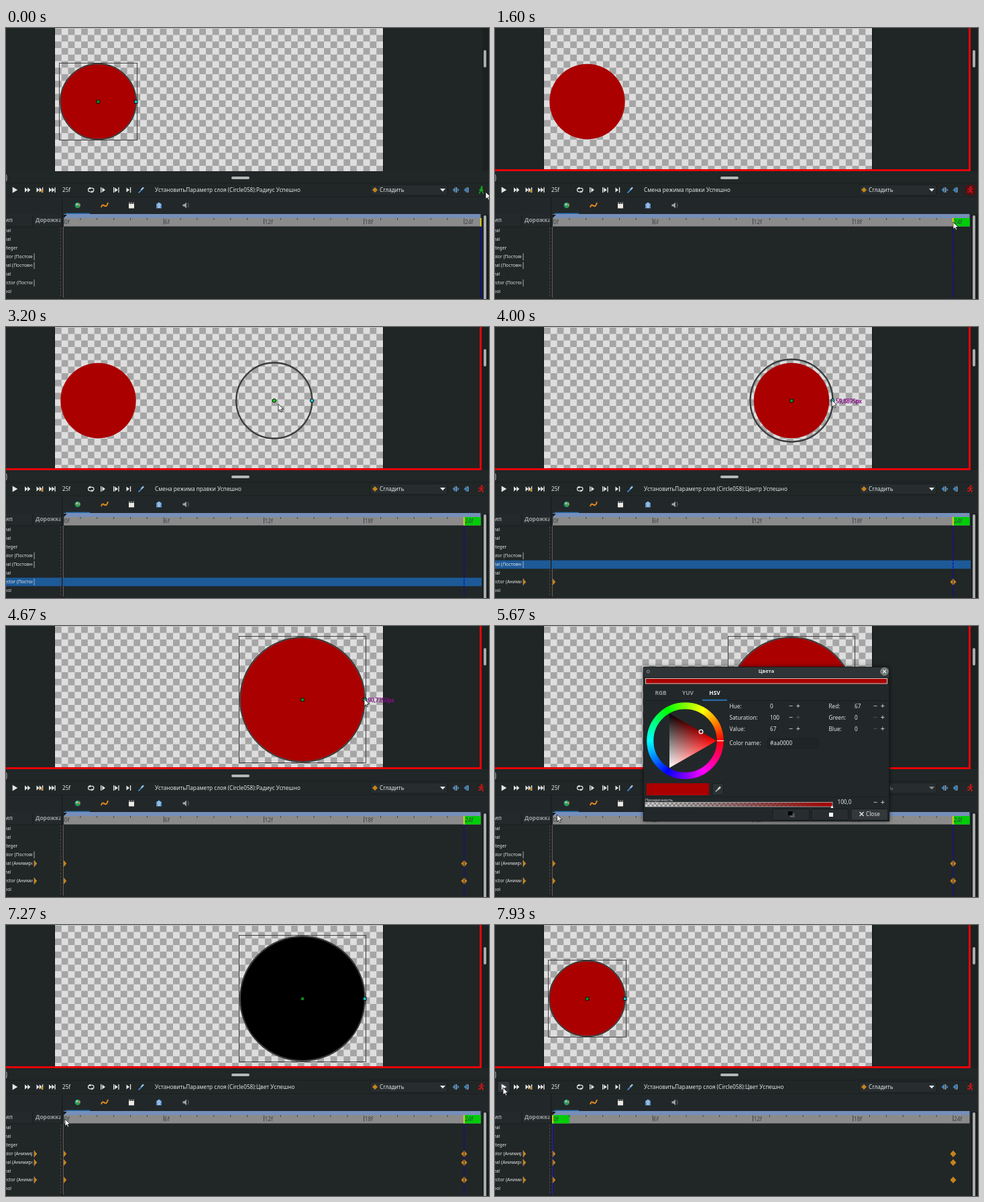
An HTML page with a canvas for the animation above (8000 ms loop, 720x405 px).

```html
<!DOCTYPE html>
<html lang="ru">
<head>
<meta charset="utf-8">
<style>
html, body { margin: 0; width: 720px; height: 405px; overflow: hidden; background: #202526; }
canvas { display: block; }
</style>
</head>
<body>
<canvas id="stage" width="720" height="405"></canvas>
<script>
const c = document.getElementById('stage').getContext('2d');
const LOOP = 8000, STEP = 24.87, ZOOM = 1.0225, LEFT = 137.5, RIGHT = 442, CY = 110, TILE = 9.78;
const FONT = '"Noto Sans", "Open Sans", sans-serif';
const ORANGE = '#c5831c', BLUE = '#1d5a98', INK = '#e4e6e6';
const T = { edit: 600, seek: 1500, shown: 1720, grab: 2500, moved: 3450, pull: 3810,
  sized: 4600, dialog: 5500, tint: 5950, close: 6680, rewind: 7300 };

// Pointer stops: time, x, y
const stops = [
  [0, 715, 245], [130, 715, 245], [330, 709, 243], [640, 709, 243], [1250, 683, 290],
  [1680, 683, 290], [2350, 145, 115], [2550, 145, 115], [3400, 448, 115], [3520, 448, 115],
  [3780, 497, 109], [3850, 497, 109], [4500, 534, 109], [4700, 534, 109], [5200, -12, 342],
  [5560, -12, 342], [5850, 307, 158], [5950, 307, 158], [6200, 260, 131], [6270, 260, 131],
  [6560, 541, 281], [6720, 541, 281], [7180, 88, 290], [7400, 88, 290], [7860, 12, 243], [8000, 12, 243]
];

const mix = (a, b, u) => a + (b - a) * u;
const snap = v => Math.floor(v) + .5;
const frameX = f => 86 + f * STEP;
function ease(t, a, b) {
  const u = Math.min(1, Math.max(0, (t - a) / (b - a)));
  return u * u * (3 - 2 * u);
}
function pointer(t) {
  const i = Math.max(1, stops.findIndex(s => s[0] > t));
  const [t0, x0, y0] = stops[i - 1], [t1, x1, y1] = stops[i];
  const u = ease(t, t0, t1);
  return [mix(x0, x1, u), mix(y0, y1, u)];
}

function rect(x, y, w, h, fill) { c.fillStyle = fill; c.fillRect(x, y, w, h); }
function frame(x, y, w, h, color, lw = 1) {
  c.strokeStyle = color; c.lineWidth = lw; c.strokeRect(x, y, w, h);
}
function round(x, y, w, h, r, fill, stroke) {
  c.beginPath(); c.roundRect(x, y, w, h, r);
  if (fill) { c.fillStyle = fill; c.fill(); }
  if (stroke) { c.strokeStyle = stroke; c.lineWidth = .8; c.stroke(); }
}
function poly(pts, fill, x = 0, y = 0) {
  c.beginPath();
  for (let i = 0; i < pts.length; i += 2) c.lineTo(x + pts[i], y + pts[i + 1]);
  c.closePath(); c.fillStyle = fill; c.fill();
}
function line(pts, color, lw = 1) {
  c.beginPath();
  for (let i = 0; i < pts.length; i += 2) c.lineTo(pts[i], pts[i + 1]);
  c.strokeStyle = color; c.lineWidth = lw; c.stroke();
}
function circle(x, y, r, fill, stroke, lw = 1) {
  c.beginPath(); c.arc(x, y, r, 0, 7);
  if (fill) { c.fillStyle = fill; c.fill(); }
  if (stroke) { c.strokeStyle = stroke; c.lineWidth = lw; c.stroke(); }
}
function text(s, x, y, size = 8.2, color = INK, align = 'left', weight = '') {
  c.font = `${weight} ${size}px ${FONT}`;
  c.textAlign = align; c.textBaseline = 'middle'; c.fillStyle = color;
  c.fillText(s, x, y + .3);
}
function clip(x, y, w, h, draw) {
  c.save(); c.beginPath(); c.rect(x, y, w, h); c.clip(); draw(); c.restore();
}

function checker(x, y, w, h, n, light, dark) {
  clip(x, y, w, h, () => {
    rect(x, y, w, h, light);
    for (let j = 0; j * n < h; j++)
      for (let i = j % 2; i * n < w; i += 2) rect(x + i * n, y + j * n, n, n, dark);
  });
}

function handle(x, color, active) {
  if (active) return circle(x, CY, 2.7, color, '#111', 1);
  rect(x - 2.8, CY - 2.6, 5.6, 5.6, '#111');
  rect(x - 1.8, CY - 1.6, 3.6, 3.6, color);
}

function workarea(t, s) {
  rect(0, 0, 720, 216, '#202526');
  checker(73, .6 - 2 * TILE, 489, 213.4 + 2 * TILE, TILE, '#dedede', '#a5a5a5');
  rect(72.2, 0, .8, 214, '#0c0e0e');
  rect(562, 0, .8, 214, '#0c0e0e');

  const drag = t > T.grab && t < T.moved, pull = t > T.pull && t < T.sized;
  const gx = drag ? mix(LEFT, RIGHT, ease(t, 2550, 3400)) : s.x;
  const gr = pull ? ZOOM * mix(55, 90.735, ease(t, 3850, 4500)) : s.r;
  const shown = t < T.edit || t > T.shown;
  circle(s.x, CY, s.r, s.color);
  if (shown) {
    const moving = drag || pull;
    circle(gx, CY, gr + .2, null, moving ? '#4c4e4e' : '#505252', moving ? 2.4 : 1.8);
    circle(gx, CY, gr + (moving ? .9 : .5), null, '#1c1c1c', .7);
    if (!moving) {
      const x = snap(gx - gr - 1.5), y = snap(CY - gr - 1.5);
      frame(x, y, snap(gx + gr + 1.5) - x, snap(CY + gr + 1.5) - y, '#333', .9);
    }
    handle(gx, drag ? '#10d018' : '#0a9a1c', drag);
    handle(gx + gr, '#20c4cc', drag || pull);
  }
  if (t > T.pull && t < 4740) {
    const label = (gr / ZOOM).toFixed(4).replace('.', ',') + 'px';
    text(label, gx + gr + 4.6, 111.8, 8, '#201020');
    text(label, gx + gr + 5.2, 111.8, 8, '#c010c0');
  }
  if (t >= T.edit) {
    rect(0, 211, 709, 3, '#e80008');
    rect(706, 0, 3, 214, '#e80008');
  }
  rect(710, 0, 10, 216, '#1b2021');
  round(712, 33, 4, 26, 2, '#a9acac');
}

function skip(x, y, n, bar) {
  for (let i = 0; i < n; i++) poly([0, -3.8, 4.2, 0, 0, 3.8], INK, x + i * 4.2, y);
  if (bar) rect(x + n * 4.2, y - 3.8, 1.4, 7.6, bar);
}

function man(x, y, color, running) {
  circle(x + .6, y - 4.2, 1.5, color);
  line([x + .3, y - 2, x - .2, y + 1.2], color, 2.2);
  line(running ? [x - 4, y, x - 2, y - 2, x + 2, y - 1, x + 4, y - 2] : [x - 3, y + 1, x - 1, y - 2, x + 1, y - 2, x + 3, y + 1], color, 1.2);
  line(running ? [x - 4.5, y + 3, x - 1.5, y + 3, x, y + 1, x + 2.5, y + 2.6, x + 2, y + 5.5] : [x - 3, y + 5.5, x - 1, y + 1, x + 1, y + 1, x + 3, y + 5.5], color, 1.4);
}

function toolbar(t, status) {
  rect(0, 214, 720, 40, '#212627');
  rect(0, 231.5, 720, .7, '#191d1e');
  rect(0, 252.5, 720, 1, '#171b1c');
  round(336, 222, 27, 4, 2, '#b4b7b7');
  round(-4, 219, 5, 10, 2, null, '#d5d7d7');
  const y = 242;
  if (t > 7780) round(4, 233.5, 18, 17, 2, '#33393b', '#14181a');
  poly([0, -4.6, 7.6, 0, 0, 4.6], INK, 9.7, y);
  skip(28, y, 2);
  skip(45.5, y, 2, INK);
  poly([0, -2.8, 2.2, 0, 0, 2.8, -2.2, 0], ORANGE, 53.4, y + 1.6);
  skip(64, y, 2, INK);
  text('25f', 84, y);
  c.beginPath(); c.roundRect(122.5, 239.4, 8.4, 5.4, 2.7);
  c.strokeStyle = INK; c.lineWidth = 1.2; c.stroke();
  poly([-1.6, -1.8, 1.8, 0, -1.6, 1.8], INK, 129, 244.8);
  poly([1.6, -1.8, -1.8, 0, 1.6, 1.8], INK, 124.4, 239.4);
  rect(141, 238, 1.3, 8, INK); poly([0, -3.4, 4.6, 0, 0, 3.4], INK, 143.4, y);
  rect(160, 238, 1.3, 8, INK); poly([0, -3.4, 4.6, 0, 0, 3.4], INK, 162.2, y); rect(167.3, 238, 1.3, 8, INK);
  poly([0, -3.4, 4.6, 0, 0, 3.4], INK, 179.5, y); rect(184.9, 238, 1.3, 8, INK);
  line([197.5, 246.5, 202, 242], '#3d86c8', 1.8);
  line([201.5, 242, 205, 238.4], '#9cc4e6', 2.4);
  text(status, 222, y);
  const dim = t > T.dialog && t < T.close;
  round(543, 234.5, 115, 15.5, 2, '#272d2f', '#171b1c');
  poly([0, -4, 4, 0, 0, 4, -4, 0], ORANGE, 550, y);
  text('Сгладить', 557, y, 8.2, dim ? '#888c8d' : INK);
  poly([-4, -2, 4, -2, 0, 2.4], dim ? '#888c8d' : INK, 651, y);
  for (const [x, d] of [[670, 1], [687, -1]]) {
    poly([-4.5, 0, 0, -4.5, 0, 4.5], '#4584b8', x, y);
    rect(x + .8, y - 4, 1.4, 8, '#9fb7c8');
    poly([0, -2.6, 2.8 * d, 0, 0, 2.6], '#4584b8', x + 3, y);
  }
  const edit = t >= T.edit;
  if (edit && t < 1800) round(701, 234.5, 15.5, 15.5, 2, '#4e1216');
  else if (!edit && t > 400) round(701, 234.5, 15.5, 15.5, 2, '#181c1d');
  man(708.5, y, edit ? '#e01414' : '#18b020', edit);
}

function tabs() {
  rect(0, 253, 720, 26, '#22282a');
  rect(83, 253, 1.2, 152, '#171b1c');
  rect(89, 276.6, 36, 2.2, '#2a70b4');
  circle(106.8, 265, 4.2, '#2a9a5a');
  circle(105.8, 263.6, 1.8, '#7fc8e0');
  poly([0, 0, 3, -3, 3.6, 1], '#d68a28', 107, 265);
  c.beginPath(); c.moveTo(142, 268); c.bezierCurveTo(145, 258, 148, 274, 152, 261);
  c.strokeStyle = '#e58a1c'; c.lineWidth = 2; c.stroke();
  rect(183, 262.5, 8, 7, '#eceae4');
  rect(183, 260.5, 8, 2, '#8a8a88');
  rect(185, 260.5, 1.5, 2, '#222'); rect(188, 260.5, 1.5, 2, '#222');
  poly([-4, 4.5, -4, -2, 0, -4.8, 4, -2, 4, 4.5], '#5a93cc', 228, 265);
  circle(228, 264.4, 1.8, null, '#e8f0f8', 1);
  line([226, 268, 230, 268], '#e8f0f8', 1);
  poly([-4, -1.6, -1.6, -1.6, 1.4, -4.4, 1.4, 4.4, -1.6, 1.6, -4, 1.6], '#a4a8a8', 267.5, 265);
  line([271, 261.5, 272.3, 265, 271, 268.5], '#5e6364', 1.2);
}

function ruler(now, edit) {
  rect(86, 278, 621.5, 6, '#768fba');
  rect(86, 284, 621.5, 12.5, '#8b8b8b');
  if (edit && now < 25) rect(frameX(now), 284, STEP, 12.5, '#00cc08');
  for (let f = 0; f < 25; f++) {
    const major = f % 6 === 0;
    rect(frameX(f) - .4, major ? 284.5 : 284, .9, major ? 9 : 2.8, '#34383a');
    if (major) text(f + 'f', frameX(f) + 1, 290, 8.4, '#3c4042');
  }
  poly([0, 0, 5, 0, 0, 5], '#15181a', 86, 279);
  rect(frameX(now) - .9, 284, 1.8, 12.5, '#e8d810');
}

function diamond(x, y, now, f) {
  if (f === 0) poly([0, -5, 4.4, 0, 0, 5], ORANGE, x, y);
  else poly([0, -5, 4.6, 0, 0, 5, -4.6, 0], ORANGE, x, y);
  if (now === f) rect(x - .6, y - 4.5, 1.2, 9, f ? '#3a3550' : '#74593a');
}

function params(t, now) {
  rect(0, 279, 720, 126, '#212627');
  rect(0, 279, 82, 17.5, '#24292b');
  rect(39.5, 280, .8, 16, '#15191a');
  rect(0, 296.5, 82, .8, '#181c1d');
  text('Тип', -6, 287, 8.4, '#9b9fa0', 'left', '600');
  clip(0, 279, 81.5, 18, () => text('Дорожка', 44, 287, 8.4, '#9b9fa0', 'left', '600'));
  rect(84.8, 297, 1, 106, '#77655c');

  const selected = t > T.grab - 60 && t < T.moved ? 381 : t > T.pull - 60 && t < T.sized ? 355 : 0;
  if (selected) rect(0, selected - 6.3, 709, 12.6, BLUE);
  const keyed = { 342: t > T.tint + 60, 355: t > T.sized, 381: t > T.moved };
  const types = ['Real', 'Real', 'Integer', 'Color', 'Real', 'Real', 'Vector', 'Bool'];
  types.forEach((type, i) => {
    const y = 303 + i * 13;
    const mode = y in keyed ? (keyed[y] ? ' (Анимировано)' : ' (Постоянный)') : '';
    clip(0, y - 6, 39.5, 12, () => text(type + mode, -6.3, y, 6.8));
    if (y in keyed) {
      if (keyed[y]) poly([0, -5, 4.4, 0, 0, 5], ORANGE, 42, y);
      rect(41.6, y - 5.2, .9, 10.4, keyed[y] ? '#a88a5a' : '#b4b8b8');
    }
  });
  c.setLineDash([3, 2]);
  line([81.7, 298, 81.7, 403], '#4a5051', 1);
  c.setLineDash(now === 24 ? [3.5, 1.5] : []);
  line([frameX(now), 297, frameX(now), 403], now === 25 ? '#101088' : '#0c0cae', now === 25 ? 2 : 1.3);
  c.setLineDash([]);
  for (const y in keyed) if (keyed[y]) {
    diamond(86, +y, now, 0);
    diamond(683, +y, now, 24);
  }
  rect(710, 279, 10, 126, '#1b2021');
  round(712, 280, 4, 130, 2, '#a9acac');
}

function spin(label, value, x, y, vx, px) {
  text(label, x, y);
  text(value, vx, y);
  text('−', px - 11, y, 11, label !== 'Red:' && px > 500 && !value ? '#5d6364' : INK, 'center');
  text('+', px, y, 11, value === 100 ? '#5d6364' : INK, 'center');
}

function wheel(v) {
  const x = 283.5, y = 171.5, hue = c.createConicGradient(0, x, y);
  for (let i = 0; i <= 12; i++) hue.addColorStop(i / 12, `hsl(${360 - i * 30} 100% 50%)`);
  circle(x, y, 52.2, null, hue, 10);
  line([331, y, 341, y], '#fff', 1.2);
  const tri = [330.5, y, 260, 131, 260, 212];
  poly(tri, '#000');
  c.globalCompositeOperation = 'lighter';
  for (const [a, b, d, e, color] of [[295.2, 151.2, 260, 212, '#fff'], [260, y, 330.5, y, '#f00']]) {
    const g = c.createLinearGradient(a, b, d, e);
    g.addColorStop(0, '#000'); g.addColorStop(1, color);
    poly(tri, g);
  }
  c.globalCompositeOperation = 'source-over';
  circle(mix(260, 330.5, v), mix(131, y, v), 2.8, null, '#fff', 1.3);
}

function dialog(v, color) {
  c.save();
  c.shadowColor = 'rgba(0,0,0,.6)'; c.shadowBlur = 6;
  round(221, 61, 367, 231, [4, 4, 0, 0], '#22282a');
  c.restore();
  round(221, 61, 367, 15.5, [4, 4, 0, 0], '#2f3537');
  frame(221.3, 61.3, 366.4, 230.4, '#121617', .8);
  text('Цвета', 404.5, 68, 7.4, INK, 'center', 'bold');
  circle(228.3, 68, 2, null, '#8f9495', 1);
  circle(580.5, 68, 5.7, '#6d7273', '#a0a4a5', .8);
  line([578, 65.5, 583, 70.5], '#eee', 1.1);
  line([583, 65.5, 578, 70.5], '#eee', 1.1);
  rect(224, 78, 361, 8.5, color);
  frame(224.5, 78.5, 360, 7.5, '#d5d7d7', .9);

  rect(224, 111.2, 361, .7, '#14181a');
  [['RGB', 247], ['YUV', 287.5], ['HSV', 327.5]].forEach(([s, x], i) =>
    text(s, x, 100, 8.4, i === 2 ? '#f2f4f4' : '#94999a', 'center', '600'));
  rect(309, 109.8, 37, 2, '#2a70b4');
  wheel(v);
  const pct = Math.round(v * 100);
  spin('Hue:', 0, 349.5, 120, 410, 452);
  spin('Saturation:', 100, 349.5, 137, 410, 452);
  spin('Value:', pct, 349.5, 154, 410, 452);
  spin('Red:', pct, 497.5, 120, 536, 578);
  spin('Green:', 0, 497.5, 137, 536, 578);
  spin('Blue:', 0, 497.5, 154, 536, 578);
  text('Color name:', 349.5, 175.5);
  round(406, 168, 75, 15, 2, '#1f2426', '#1b1f21');
  text('#' + Math.round(v * 255).toString(16).padStart(2, '0') + '0000', 410, 175.5);

  rect(226, 235, 93, 18, color);
  round(324, 235.5, 16.5, 17, 2, '#2c3234', '#161a1b');
  line([329, 247.5, 333, 243.5], '#c8cccc', 1.4);
  line([332.5, 244, 336, 240.5], '#c8cccc', 2.6);
  rect(221, 255, 367, .8, '#181c1d');
  text('Прозрачность', 224, 259.7, 5.9);
  checker(224, 263.5, 279, 6.5, 3.2, '#d8d8d8', '#8f8f8f');
  const fade = c.createLinearGradient(224, 0, 503, 0);
  fade.addColorStop(0, 'rgba(0,0,0,0)'); fade.addColorStop(1, color);
  rect(224, 263.5, 279, 6.5, fade);
  frame(224, 263.5, 279, 6.5, '#c4c8c8', .7);
  poly([-2, 2, 0, -2, 2, 2], '#fff', 502.5, 270);
  text('100,0', 510.5, 263.5);
  text('−', 567, 263.5, 11, INK, 'center');
  text('+', 578, 263.5, 11, INK, 'center');

  for (const x of [414, 472, 531]) round(x, 273.5, 54.5, 16.5, 2, x > 500 ? '#33393b' : '#282e30', '#14181a');
  rect(440, 280, 6.5, 6, '#555a5b');
  rect(437, 277, 6.5, 6, '#000');
  rect(498, 279, 6, 6, '#fff');
  line([543.5, 278, 549.5, 284], INK, 1.4);
  line([549.5, 278, 543.5, 284], INK, 1.4);
  text('Close', 553, 281, 8.2);
}

function cursor([x, y]) {
  const arrow = [0, 0, 0, 10.6, 2.5, 8.4, 4.1, 12, 5.8, 11.2, 4.2, 7.8, 7.4, 7.5];
  poly(arrow, '#fff', x, y);
  c.strokeStyle = '#111'; c.lineWidth = .8; c.stroke();
}

function draw(t) {
  const now = t < T.seek ? 25 : t < T.rewind ? 24 : 0;
  const start = now === 0;
  const v = mix(.667, 0, ease(t, T.tint, 6200));
  const tint = `rgb(${Math.round(v * 255)} 0 0)`;
  const shape = {
    x: t > T.moved && !start ? RIGHT : LEFT,
    r: ZOOM * (t > T.sized && !start ? 90.735 : 55),
    color: start ? '#aa0000' : tint
  };
  const set = name => `УстановитьПараметр слоя (Circle058):${name} Успешно`;
  const status = t < T.edit ? set('Радиус') : t < T.moved ? 'Смена режима правки Успешно'
    : t < T.sized ? set('Центр') : t < T.tint + 60 ? set('Радиус') : set('Цвет');
  workarea(t, shape);
  toolbar(t, status);
  params(t, now);
  tabs();
  ruler(now, t >= T.edit);
  if (t >= T.dialog && t < T.close) dialog(v, tint);
  cursor(pointer(t));
}

const begin = performance.now();
function tick() {
  draw((performance.now() - begin) % LOOP);
  requestAnimationFrame(tick);
}
tick();
</script>
</body>
</html>
```
